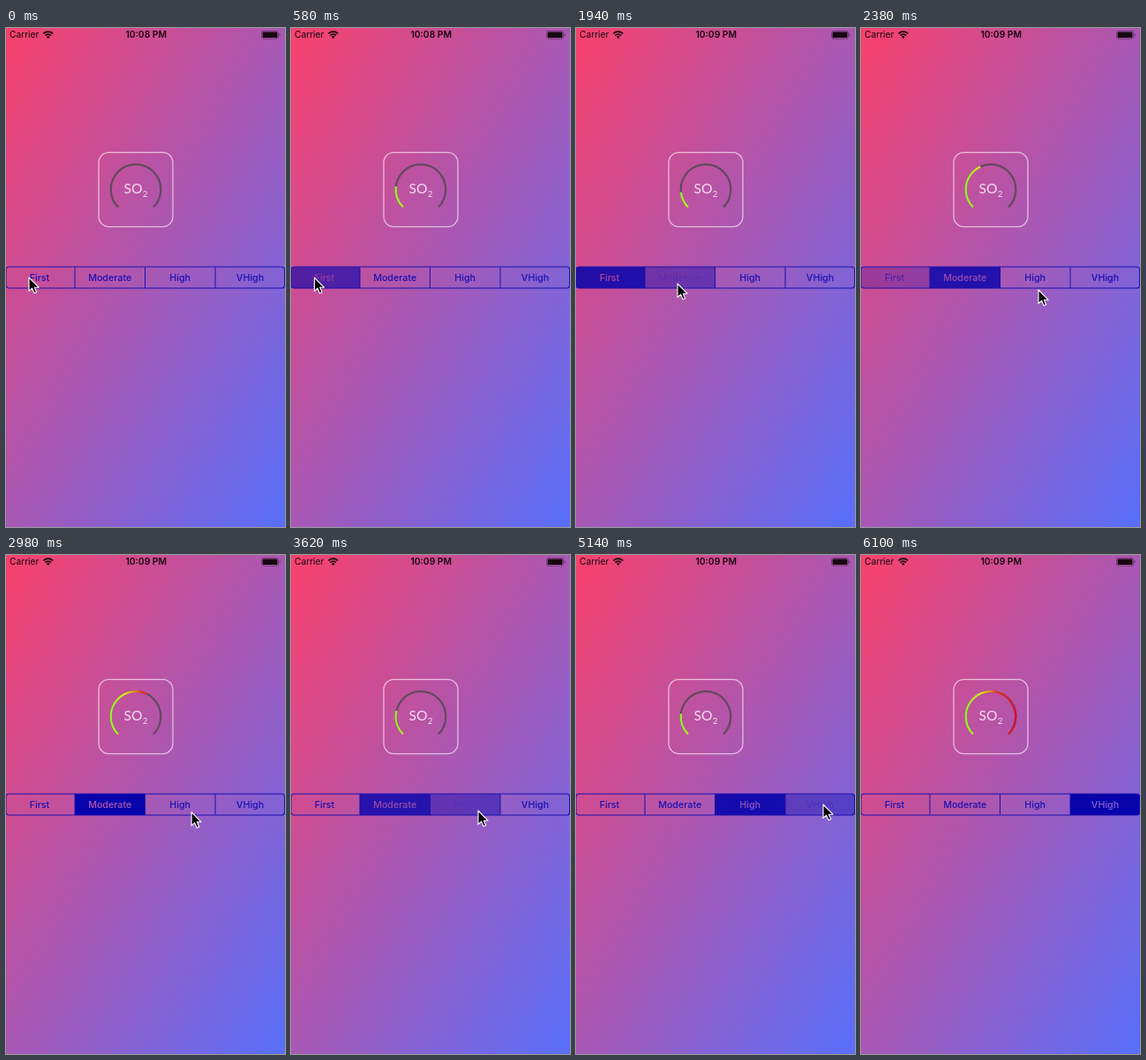
An HTML page that plays this animation: 316 px wide and 564 px high, repeating every 6.12 s.

```html
<!DOCTYPE html>
<html lang="en">
<head>
<meta charset="utf-8">
<title>SO2 gauge</title>
<style>
  html, body { margin: 0; width: 100%; height: 100%; overflow: hidden; }
  svg { display: block; width: 100vw; height: 100vh; }
  text { font-family: Inter, "Liberation Sans", sans-serif; }
  .label { font-size: 10.7px; font-weight: 500; text-anchor: middle; }
  .gas { font-family: Lato, "Open Sans", sans-serif; fill: #f3dcf0; }
</style>
</head>
<body>
<svg viewBox="0 0 316 564" preserveAspectRatio="none">
  <defs>
    <linearGradient id="sky" x1="0" y1="0" x2="1" y2="1">
      <stop offset="0" stop-color="#f9416c"/>
      <stop offset="1" stop-color="#586ffb"/>
    </linearGradient>
    <linearGradient id="heat" gradientUnits="userSpaceOnUse" x1="118" y1="0" x2="176" y2="0">
      <stop offset="0" stop-color="#92f02c"/>
      <stop offset=".28" stop-color="#dcec20"/>
      <stop offset=".45" stop-color="#f0a024"/>
      <stop offset=".62" stop-color="#e83428"/>
      <stop offset="1" stop-color="#d0102a"/>
    </linearGradient>
    <clipPath id="pill"><rect x="-.5" y="270" width="316.5" height="24" rx="3.5"/></clipPath>
  </defs>
  <rect width="316" height="564" fill="url(#sky)"/>

  <g fill="#17060f">
    <text x="4" y="11.4" font-size="10.2">Carrier</text>
    <text id="clock" x="158.7" y="11.4" font-size="10.3" font-weight="600" text-anchor="middle"></text>
    <path d="M47.8 12 L45.9 9.9 A2.7 2.7 0 0 1 49.7 9.9 Z"/>
    <g fill="none" stroke="#17060f" stroke-width="1.6">
      <path d="M44.4 8.5 A4.8 4.8 0 0 1 51.2 8.5"/>
      <path d="M42.4 6.4 A7.6 7.6 0 0 1 53.2 6.4"/>
    </g>
    <rect x="289.5" y="3.4" width="19" height="8.8" rx="2.2" fill="none" stroke="#17060f" stroke-opacity=".45" stroke-width=".8"/>
    <rect x="290.6" y="4.5" width="16.8" height="6.6" rx="1.2"/>
    <path d="M309.6 6.3 A1.6 1.6 0 0 1 309.6 9.3 Z" fill-opacity=".6"/>
  </g>

  <rect x="105" y="140.6" width="84" height="84" rx="11.5" fill="none" stroke="#fff" stroke-opacity=".62" stroke-width="1.3"/>
  <g fill="none" stroke-width="2.3">
    <path d="M127 202.5 A28.3 28.3 0 1 1 167 202.5" stroke="#624a5c"/>
    <path id="arc" d="M127 202.5 A28.3 28.3 0 1 1 167 202.5" pathLength="1" stroke="url(#heat)"/>
  </g>
  <text class="gas" x="133.6" y="187.2" font-size="15.6">SO</text>
  <text class="gas" x="154.8" y="191" font-size="9.8">2</text>

  <g id="segments" clip-path="url(#pill)"></g>
  <path d="M78 270V294M157.5 270V294M237 270V294" stroke="#1a10ac"/>
  <rect x="0" y="270" width="315.6" height="24" rx="3.5" fill="none" stroke="#1a10ac" stroke-width="1.1"/>

  <path id="cursor" d="M0 0V15.4L3.6 12.1L6 17.8L8.7 16.6L6.3 11.2H11Z" fill="#000" stroke="#fff" stroke-width="1.1" stroke-linejoin="round"/>
</svg>
<script>
const LOOP = 6120, FADE = 1000, PRESS = 90, PRESSED = 0.3;
const BLUE = "#0704ac";
const get = id => document.getElementById(id);
const clamp = v => Math.min(1, Math.max(0, v));
const ease = v => (v = clamp(v), v * v * (3 - 2 * v));

const segments = [
  { name: "First",    x: -1,    end: 78,    mid: 38,    start: 100,  level: 0.4 },
  { name: "Moderate", x: 78,    end: 157.5, mid: 117.7, start: 1700, level: 0.6 },
  { name: "High",     x: 157.5, end: 237,   mid: 197.2, start: 3350, level: 0.8 },
  { name: "VHigh",    x: 237,   end: 317,   mid: 276.5, start: 4950, level: 1 }
];

// [time, x, y] of the pointer tip
const pointer = [
  [0, 26, 282], [550, 26, 282], [1250, 115, 289], [1950, 115, 289],
  [2380, 201, 296], [2700, 206, 294], [3150, 212, 289], [3650, 212, 289],
  [4100, 265, 295], [4750, 280, 282], [5560, 280, 282], [5900, 320, 372], [LOOP, 320, 372]
];

get("segments").innerHTML = segments.map((s, i) => {
  const box = `x="${s.x}" y="270" width="${s.end - s.x}" height="24"`;
  const label = fill => `<text class="label" x="${s.mid}" y="285.8" fill="${fill}">${s.name}</text>`;
  return `<mask id="cut${i}" maskUnits="userSpaceOnUse" ${box}><rect ${box} fill="#fff"/>${label("#000")}</mask>
    <g id="fill${i}"><rect ${box} fill="${BLUE}" mask="url(#cut${i})"/></g>
    <g id="label${i}">${label("#1a10b0")}</g>`;
}).join("");

function selection(i, t) {
  const { start } = segments[i], next = segments[i + 1];
  if (t < start - PRESS) return 0;
  if (t < start) return PRESSED;
  if (next && t >= next.start) return 1 - ease((t - next.start) / FADE);
  return PRESSED + (1 - PRESSED) * ease((t - start) / FADE);
}

function pointerAt(t) {
  const k = pointer.findIndex(p => p[0] > t);
  const [t0, x0, y0] = pointer[k - 1], [t1, x1, y1] = pointer[k];
  const e = ease((t - t0) / (t1 - t0));
  return [x0 + (x1 - x0) * e, y0 + (y1 - y0) * e];
}

function render(t) {
  get("clock").textContent = t < 600 ? "10:08 PM" : "10:09 PM";
  segments.forEach((s, i) => {
    const amount = selection(i, t);
    get("fill" + i).setAttribute("opacity", amount);
    get("label" + i).setAttribute("opacity", 1 - amount);
  });
  const active = segments.filter(s => t >= s.start).pop();
  const level = active ? active.level * clamp((t - active.start) / 1000) : 0;
  get("arc").setAttribute("stroke-dasharray", `${level} 2`);
  get("arc").setAttribute("visibility", level > 0 ? "visible" : "hidden");
  get("cursor").setAttribute("transform", `translate(${pointerAt(t)})`);
}

let origin;
function tick(now) {
  origin ??= now;
  render(Math.max(0, now - origin) % LOOP);
  requestAnimationFrame(tick);
}
render(0);
requestAnimationFrame(tick);
</script>
</body>
</html>
```
